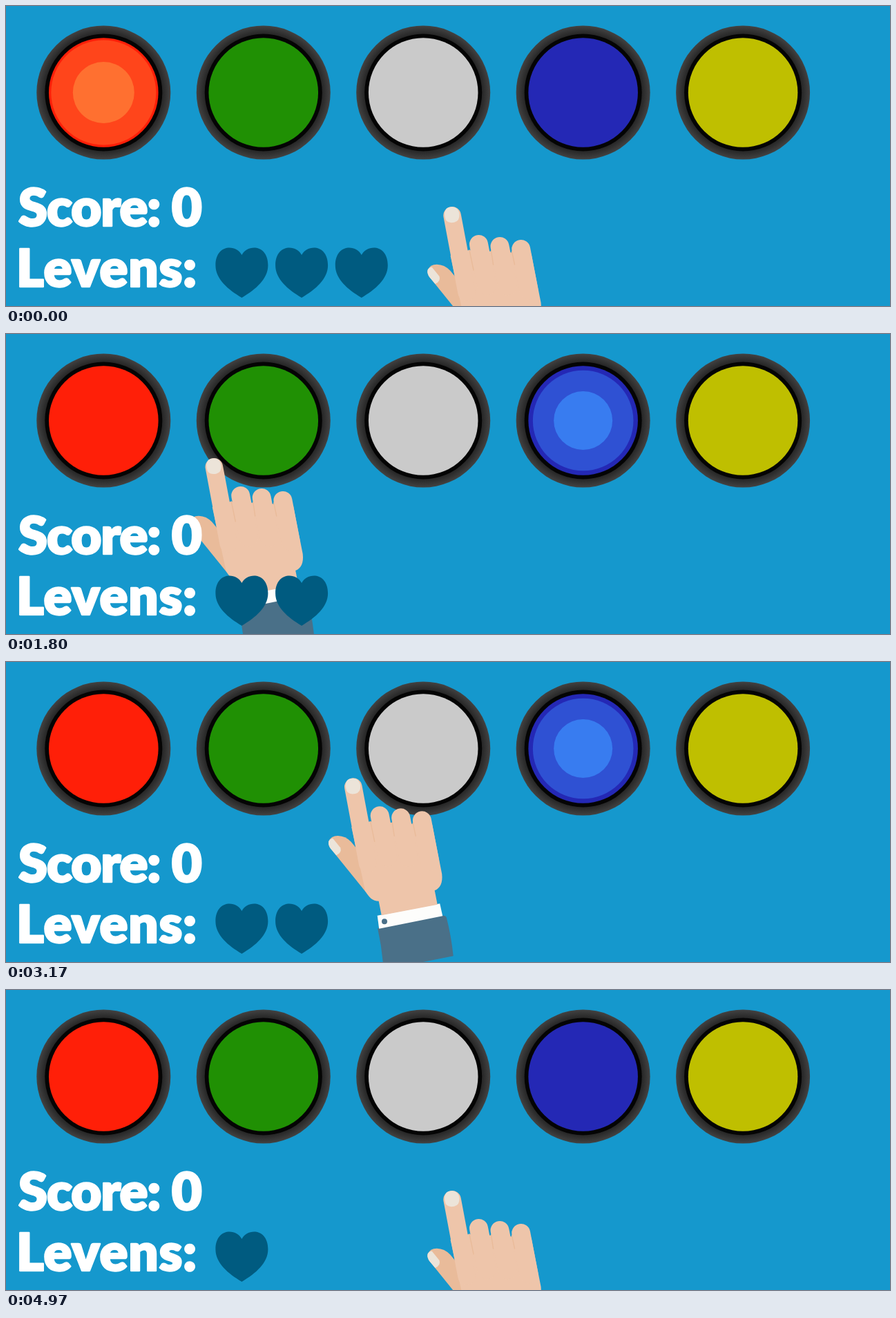
Write an HTML page with a canvas that moves like this. It is 1280x435 px and loops after 5 s.

```html
<!DOCTYPE html>
<html lang="nl">
<head>
<meta charset="utf-8">
<title>Knoppenspel</title>
<style>
html, body { margin: 0; width: 100%; height: 100%; overflow: hidden; background: #1598cd; }
canvas { display: block; width: 100%; height: 100%; }
</style>
</head>
<body>
<canvas id="stage" width="1280" height="435"></canvas>
<script>
const ctx = document.getElementById('stage').getContext('2d');

const LOOP = 5000, STEP = 30;
const HOLD_START = 2010, HOLD_END = 2210;
const BLINK = 15; // steps a lamp stays on, then off
const LAST = 160;

const SKIN = '#eec5aa', SHADE = '#e9bb9a', NAIL = '#ece4d9', SLEEVE = '#4a7088';
const LAMPS = ['#ff1f08', '#209004', '#cacaca', '#2428b5', '#bfbf00'];
const GLOW = {
  0: [['#ff451b', 76], ['#ff7030', 44.5]],
  3: [['#2f51d3', 72.8], ['#387cf0', 42.5]]
};

// Hand offset at key steps: [step, x, y]
const PATH = [[0, -3, 122], [67, -388, -2], [141, 154, 1], [LAST, -3, 122]];

function stepAt(t) {
  if (t < HOLD_END) return Math.min(Math.floor(t / STEP), HOLD_START / STEP);
  return HOLD_START / STEP + 1 + Math.floor((t - HOLD_END) / STEP);
}

function handAt(k) {
  const i = Math.max(1, PATH.findIndex(p => p[0] >= k));
  const [k0, x0, y0] = PATH[i - 1], [k1, x1, y1] = PATH[i];
  const u = (k - k0) / (k1 - k0);
  return [x0 + (x1 - x0) * u, y0 + (y1 - y0) * u];
}

function litLamp(k) {
  const phase = Math.floor(k / BLINK);
  if (phase % 2 || phase > 8) return -1;
  return phase < 4 ? 0 : 3;
}

function livesAt(k) {
  return k < 60 ? 3 : k < 135 ? 2 : 1;
}

function disc(x, y, r, fill) {
  ctx.fillStyle = fill;
  ctx.beginPath();
  ctx.arc(x, y, r, 0, Math.PI * 2);
  ctx.fill();
}

function shape(d, fill) {
  ctx.fillStyle = fill;
  ctx.fill(new Path2D(d));
}

function line(x0, y0, x1, y1, width, color) {
  ctx.strokeStyle = color;
  ctx.lineWidth = width;
  ctx.lineCap = 'round';
  ctx.beginPath();
  ctx.moveTo(x0, y0);
  ctx.lineTo(x1, y1);
  ctx.stroke();
}

function drawLamp(i, lit) {
  const x = 141.3 + i * 231.45, y = 125.5;
  const rim = ctx.createRadialGradient(x, y, 84, x, y, 97);
  rim.addColorStop(0, '#242424');
  rim.addColorStop(1, '#424242');
  disc(x, y, 97, rim);
  disc(x, y, 85, '#040404');
  disc(x, y, 79.3, LAMPS[i]);
  if (lit) for (const [color, r] of GLOW[i]) disc(x, y, r, color);
}

function drawHand([dx, dy]) {
  ctx.save();
  ctx.translate(dx, dy);

  // Sleeve and cuff
  shape('M684.5 387 L779 368.5 Q783 368 784 371 Q791 398 794 427 L693 447 Q691 417 684.5 387 Z', SLEEVE);
  shape('M684 368.5 L774.5 351 L778.5 369 L686.5 387.5 Z', '#fdfdfb');
  disc(694.3, 376.8, 4, SLEEVE);

  // Thumb
  shape('M613.5 261 Q617 252.5 627 252.7 Q638 253 646 261.5 L658 276 L672 338 L667 334 L617 272 Q612.5 266 613.5 261 Z', SHADE);
  shape('M613.5 261 Q615 257 619.5 256.5 L630.5 270 Q633 277 624.5 281 L616 271 Q612.5 266 613.5 261 Z', NAIL);

  // Palm, wrist and fingers
  shape('M646.5 240 L673 232 L763.5 237 L777.5 308 C779 321 775 329 767 332 L771 352.5 L690 368 L686 347.5 C677 347.5 672 342 666.5 333 Z', SKIN);
  line(649.1, 181.8, 670, 293, 25.6, SKIN);
  line(687.5, 223.5, 699, 284, 27, SKIN);
  line(718, 226.5, 729, 284, 27, SKIN);
  line(748.7, 230.5, 760, 290, 27, SKIN);

  line(674, 232, 680, 261, 1.4, SHADE);
  line(705.5, 233, 708.5, 253, 1.4, SHADE);
  line(735.5, 234, 739.5, 253, 1.4, SHADE);

  // Nail of the index finger
  shape('M638 180 C638 172 643 169.3 648.5 169.3 C655 169.3 659 174 659.5 180 Q660 190 652 191.7 Q640 194 638.5 184 Z', NAIL);
  ctx.restore();
}

function drawHeart(i) {
  ctx.save();
  ctx.translate(341.4 + i * 86.7, 0);
  shape('M0 361 C-8 345 -38 345 -38 376 C-38 396 -20 411 0 423 C20 411 38 396 38 376 C38 345 8 345 0 361 Z', '#005b80');
  ctx.restore();
}

function label(text, x, y, spacing) {
  ctx.letterSpacing = spacing + 'px';
  ctx.fillText(text, x, y);
  ctx.strokeText(text, x, y);
}

function drawText() {
  ctx.fillStyle = ctx.strokeStyle = '#fff';
  ctx.lineWidth = 2.5;
  ctx.lineJoin = 'round';
  ctx.font = '900 76px Lato, sans-serif';
  label('Score: 0', 18, 319, -1.1);
  label('Levens:', 15, 407, 0.8);
}

function draw(now) {
  const k = Math.min(stepAt(now % LOOP), LAST);
  ctx.fillStyle = '#1598cd';
  ctx.fillRect(0, 0, 1280, 435);
  const lit = litLamp(k);
  LAMPS.forEach((_, i) => drawLamp(i, i === lit));
  drawHand(handAt(k));
  for (let i = 0; i < livesAt(k); i++) drawHeart(i);
  drawText();
}

let start;
function tick(now) {
  if (start === undefined) start = now;
  draw(now - start);
  requestAnimationFrame(tick);
}
requestAnimationFrame(tick);
</script>
</body>
</html>
```
